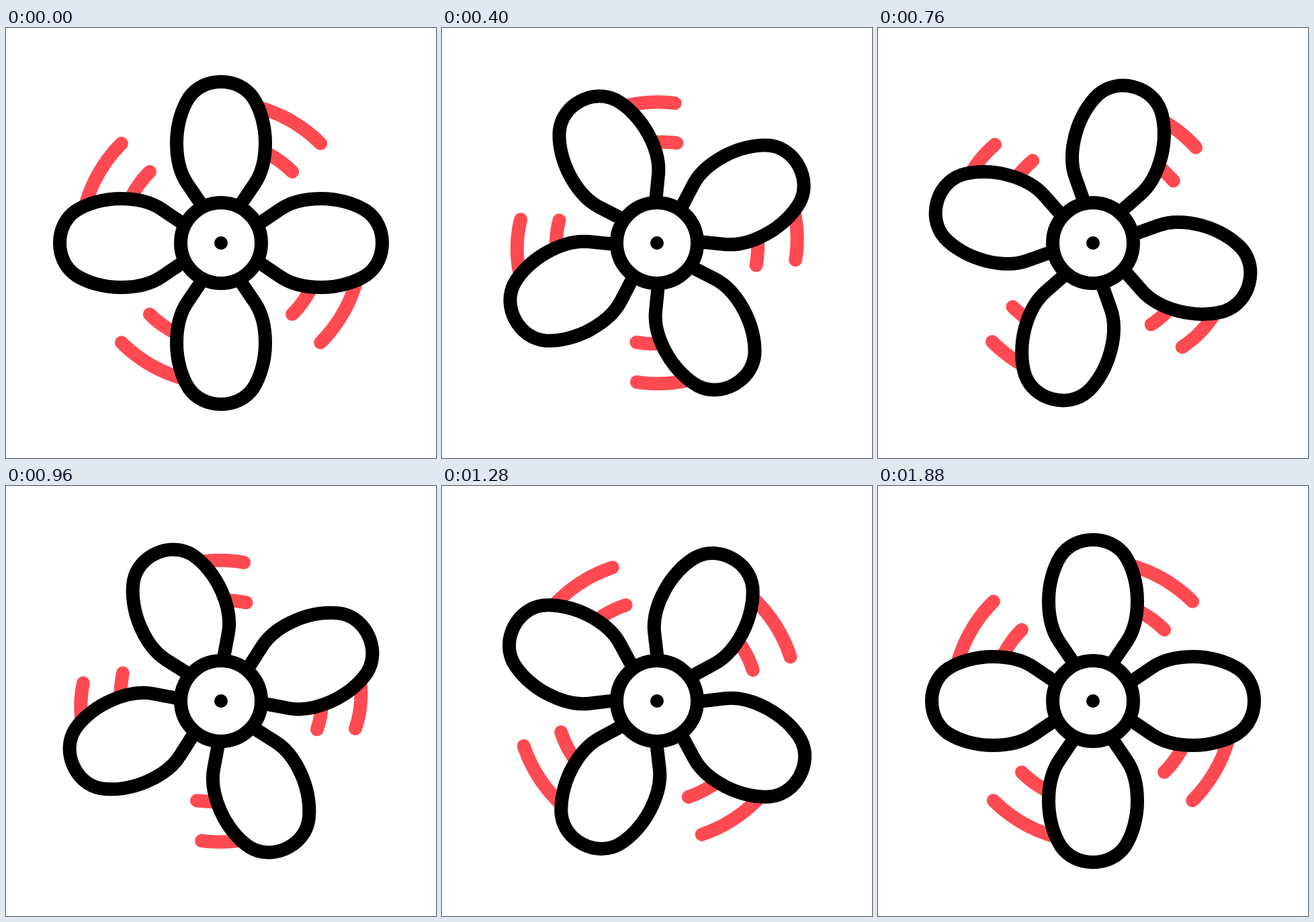
Recreate the animation shown at these times as an HTML page. Size 640x640 px, loop 1960 ms.

```html
<!DOCTYPE html>
<html lang="en">
<head>
<meta charset="utf-8">
<title>Fan</title>
<style>
  html, body { margin: 0; width: 100%; height: 100%; overflow: hidden; background: #fff; }
  svg { display: block; width: 100vw; height: 100vh; }
  .ink { fill: #fff; stroke: #000; stroke-width: 20; }
  .trail { fill: none; stroke: #ff4a52; stroke-width: 20; stroke-linecap: round; stroke-linejoin: round; }
</style>
</head>
<body>
<svg viewBox="-320 -320 640 640">
  <defs>
    <path id="blade" class="ink" d="M-29 -57 L-50 -88 C-61 -104 -66 -127 -66 -149
      C-66 -174 -59 -199 -48 -216 C-37 -232 -19 -240 0 -240
      C19 -240 37 -232 48 -216 C59 -199 66 -174 66 -149
      C66 -127 61 -104 50 -88 L29 -57"/>
  </defs>
  <g id="fan"></g>
  <circle class="ink" r="60"/>
  <circle r="10"/>
</svg>
<script>
const LOOP = 1960, STEP = 40, REST = 45;

// time, degrees turned, degrees per ms
const SPIN = [
  [80, 0, 0], [400, 28.5, .26], [560, 99.3, .44], [960, 203.5, .16],
  [1280, 242.5, .08], [1600, 259.5, .04], [1880, 270, .03]
];

// tip angle and radius of each shortened trail, per blade
const OUTER = { radius: 209.5, from: 11, tips: [[31, 210], [30.5, 206.7], [32.5, 209], [34.8, 204]] };
const INNER = { radius: 150, from: 24, tips: [[36.9, 152.7], [39.2, 152], [37.7, 151.4], [39.8, 149]] };

const fan = document.getElementById('fan');
const trails = [];

function add(tag, attrs) {
  const el = document.createElementNS('http://www.w3.org/2000/svg', tag);
  for (const key in attrs) el.setAttribute(key, attrs[key]);
  return fan.appendChild(el);
}

for (let i = 0; i < 4; i++) {
  for (const ring of [OUTER, INNER]) {
    const el = add('path', { class: 'trail', transform: `rotate(${i * 90})` });
    trails.push({ el, ring, tip: ring.tips[i] });
  }
}
for (let i = 0; i < 4; i++) add('use', { href: '#blade', transform: `rotate(${i * 90})` });

const mix = (a, b, k) => a + (b - a) * k;

function smooth(t, start, end) {
  const u = Math.min(1, Math.max(0, (t - start) / (end - start)));
  return u * u * (3 - 2 * u);
}

function turned(t) {
  if (t <= SPIN[0][0]) return 0;
  const i = SPIN.findIndex(key => key[0] >= t);
  if (i < 0) return SPIN[SPIN.length - 1][1];
  const [t0, a0, v0] = SPIN[i - 1], [t1, a1, v1] = SPIN[i];
  const d = t1 - t0, u = (t - t0) / d, w = 1 - u;
  return a0 * w * w * (1 + 2 * u) + a1 * u * u * (3 - 2 * u)
    + d * u * w * (v0 * w - v1 * u);
}

function trailPath({ ring, tip }, tuck) {
  const end = mix(REST, tip[0], tuck);
  const reach = mix(ring.radius, tip[1], tuck);
  const points = [];
  for (let n = 0; n <= 16; n++) {
    const k = n / 16;
    const a = mix(ring.from, end, k) * Math.PI / 180;
    const r = mix(ring.radius, reach, k * k);
    points.push(`${(r * Math.sin(a)).toFixed(2)} ${(-r * Math.cos(a)).toFixed(2)}`);
  }
  return 'M' + points.join('L');
}

function draw(t) {
  const tuck = smooth(t, 130, 575) - smooth(t, 915, 1355);
  fan.setAttribute('transform', `rotate(${-turned(t)})`);
  for (const trail of trails) trail.el.setAttribute('d', trailPath(trail, tuck));
}

const start = performance.now();
function tick() {
  const t = (performance.now() - start) % LOOP;
  draw(Math.floor(t / STEP) * STEP);
  requestAnimationFrame(tick);
}
tick();
</script>
</body>
</html>
```
